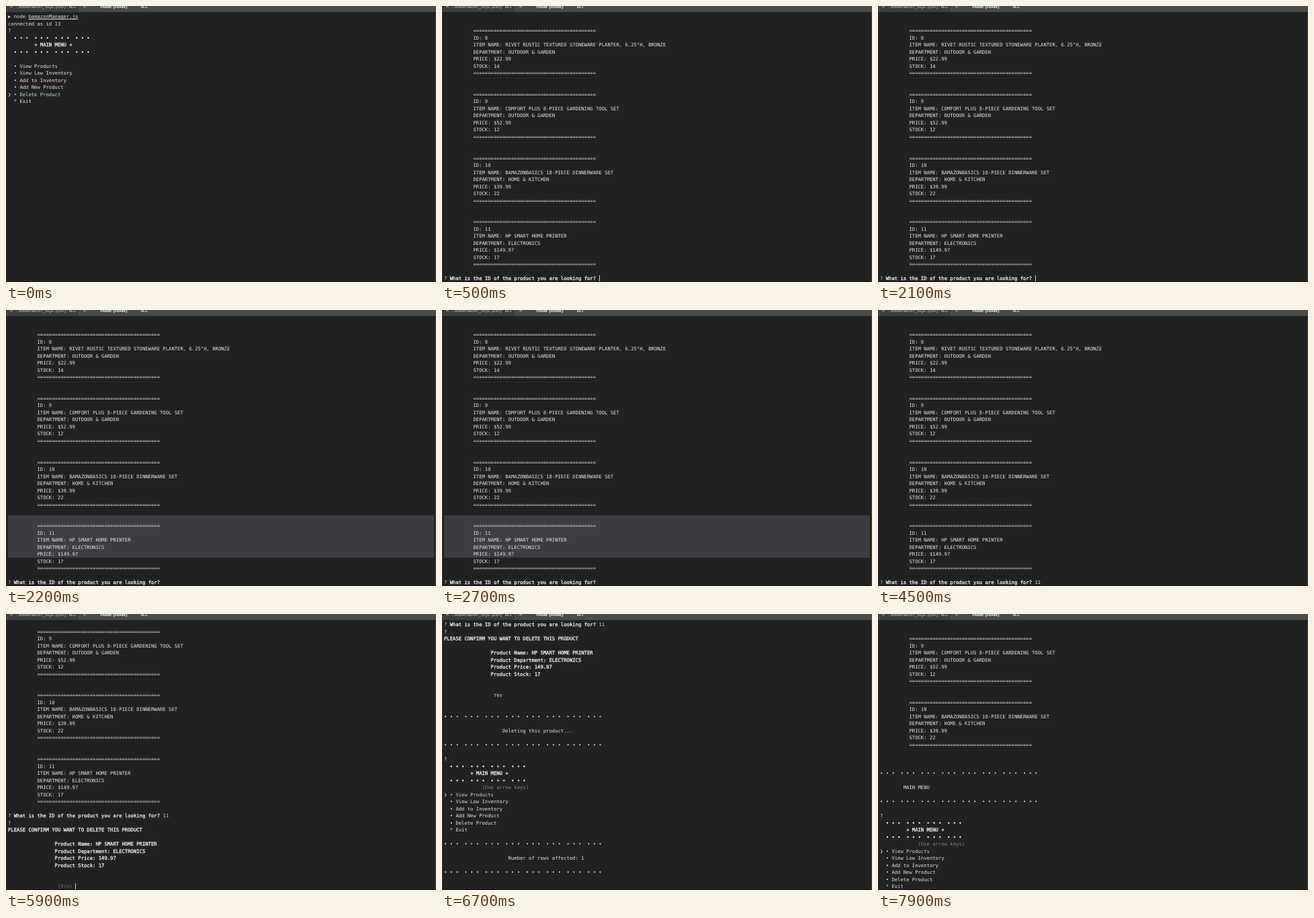
Animation of 640 by 410 pixels, one loop 8 s. Source, as an HTML page:

```html
<!DOCTYPE html>
<html lang="en">
<head>
<meta charset="utf-8">
<title>Terminal session</title>
<style>
  html, body { margin: 0; width: 100%; height: 100%; overflow: hidden; background: #212123; }
  #stage { position: relative; width: 640px; height: 410px; overflow: hidden; background: #212123; text-rendering: geometricPrecision; }
  #stage > * { position: absolute; }
  #tabs { left: 0; top: 0; width: 640px; height: 9px; background: #4d4c4d; overflow: hidden; font: 7px/8px "Liberation Sans", "DejaVu Sans", sans-serif; color: #c4c4c4; }
  #tabs span { position: absolute; top: -2px; white-space: pre; }
  #tabs div { position: absolute; top: 0; height: 9px; }
  #screen { left: 3px; top: 11.2px; font: 7.225px/10.53px "DejaVu Sans Mono", monospace; color: #e6e6e6; white-space: pre; }
  #screen div { height: 10.53px; }
  #screen b { font-weight: normal; color: #fff; -webkit-text-stroke: .25px #fff; }
  .dim { color: #828284; }
  .pick { color: #c6dedc; }
  .ask { color: #dce4c0; }
  #selection { left: 3px; top: 305px; width: 634px; height: 63px; background: #3d3c41; }
  #cursor { top: 399.5px; width: 1px; height: 10px; background: #d8d8d8; }
  #bottom { left: 0; top: 409px; width: 640px; height: 1px; background: #1b1719; }
  #right { left: 639px; top: 9px; width: 1px; height: 401px; background: #4a494b; }
  #left { left: 0; top: 9px; width: 1px; height: 401px; background: #38383a; }
</style>
</head>
<body>
<div id="stage">
  <div id="tabs">
    <div style="left:0;width:108px;background:#3e3d3f"></div>
    <div style="left:109px;width:109px;background:#4a494b"></div>
    <span style="left:5px">✕</span>
    <span style="left:15px">..s/Bamazon_SQL (zsh)</span>
    <span style="left:93px">⌘1</span>
    <span style="left:114px">✕</span>
    <span style="left:140.5px;color:#fff;font-weight:bold">node (node)</span>
    <span style="left:200px;color:#fff">⌘2</span>
  </div>
  <div id="selection"></div>
  <div id="screen"></div>
  <div id="cursor"></div>
  <div id="left"></div>
  <div id="right"></div>
  <div id="bottom"></div>
</div>
<script>
const CHAR = 4.35, LOOP = 8000;
const $ = id => document.getElementById(id);
const pad = (n, text = '') => ' '.repeat(n) + text;
const bold = text => `<b>${text}</b>`;
const tint = (name, text) => `<span class="${name}">${text}</span>`;
const blank = n => Array(n).fill('');
const stars = n => Array(n).fill('• • •').join('  ');

const product = (id, name, dept, price, stock) => {
  const rule = '='.repeat(42);
  return [rule, `ID: ${id}`, `ITEM NAME: ${name}`, `DEPARTMENT: ${dept}`,
    `PRICE: $${price}`, `STOCK: ${stock}`, rule].map(line => pad(10, line));
};
const planter = product(8, 'RIVET RUSTIC TEXTURED STONEWARE PLANTER, 6.25"H, BRONZE', 'OUTDOOR &amp; GARDEN', '22.99', 14);
const tools = product(9, 'COMFORT PLUS 8-PIECE GARDENING TOOL SET', 'OUTDOOR &amp; GARDEN', '52.99', 12);
const dinner = product(10, 'BAMAZONBASICS 18-PIECE DINNERWARE SET', 'HOME &amp; KITCHEN', '39.99', 22);
const printer = product(11, 'HP SMART HOME PRINTER', 'ELECTRONICS', '149.97', 17);

const banner = (indent, text) => [stars(8), '', pad(indent, text), '', stars(8)];
const choices = ['• View Products', '• View Low Inventory', '• Add to Inventory',
  '• Add New Product', '• Delete Product', '* Exit'];
const menu = (active, hint) => [
  tint('ask', '?'),
  pad(2, bold(stars(4))), pad(9, bold('+ MAIN MENU +')), pad(2, bold(stars(4))),
  pad(13, tint('dim', hint)),
  ...choices.map((text, i) => i === active ? tint('pick', '❯ ' + text) : pad(2, text))
];
const HINT = '(Use arrow keys)';

const question = answer => tint('ask', '?') + ' ' +
  bold('What is the ID of the product you are looking for?') + ' ' + answer;
const list = [...blank(2), ...planter, ...blank(2), ...tools, ...blank(2),
  ...dinner, ...blank(2), ...printer, ''];
const listing = typed => [...list, question(typed)];
const confirm = answer => [
  ...list.slice(10), question(tint('pick', '11')), tint('ask', '?'),
  bold('PLEASE CONFIRM YOU WANT TO DELETE THIS PRODUCT'), '',
  ...['Name: HP SMART HOME PRINTER', 'Department: ELECTRONICS', 'Price: 149.97', 'Stock: 17']
    .map(text => pad(16, bold('Product ' + text))),
  ...blank(2), pad(17, answer)
];
const yesNo = tint('dim', '(Y/n)') + ' ';

const screens = {
  menu: [tint('ask', '▶ node') + ' <u>bamazonManager.js</u>', 'connected as id 13', ...menu(4, '')],
  list: listing(''),
  one: listing('1'),
  eleven: listing('11'),
  confirm: confirm(yesNo),
  typedY: confirm(yesNo + 'y'),
  deleted: [...confirm(tint('pick', 'Yes')).slice(27), ...blank(2),
    ...banner(20, 'Deleting this product...'), '', ...menu(0, HINT), '',
    ...banner(22, 'Number of rows affected: 1')],
  products: [...blank(2), ...tools, ...blank(2), ...dinner, ...blank(3),
    ...banner(8, 'MAIN MENU'), '', ...menu(0, HINT)]
};

// [start ms, screen, cursor column (0 = hidden), selection shown]
const steps = [
  [0, 'menu', 0],
  [100, 'list', 53],
  [1100, 'list', 0],
  [1700, 'list', 53],
  [2200, 'list', 0, true],
  [2800, 'list', 53],
  [3300, 'one', 54],
  [3700, 'eleven', 55],
  [4300, 'eleven', 0],
  [4600, 'confirm', 23],
  [5300, 'confirm', 0],
  [5900, 'confirm', 23],
  [6200, 'typedY', 24],
  [6500, 'deleted', 0],
  [6800, 'products', 0]
];

let shown;
function show(step) {
  const [, name, column, selected] = step;
  if (!shown || shown[1] !== name)
    $('screen').innerHTML = screens[name].map(row => `<div>${row}</div>`).join('');
  $('cursor').style.left = 3 + Math.round(column * CHAR) + 'px';
  $('cursor').style.visibility = column ? 'visible' : 'hidden';
  $('selection').style.visibility = selected ? 'visible' : 'hidden';
  shown = step;
}

const start = performance.now();
function tick() {
  const time = (performance.now() - start) % LOOP;
  const step = steps.findLast(([at]) => at <= time);
  if (step !== shown) show(step);
  requestAnimationFrame(tick);
}
tick();
</script>
</body>
</html>
```
